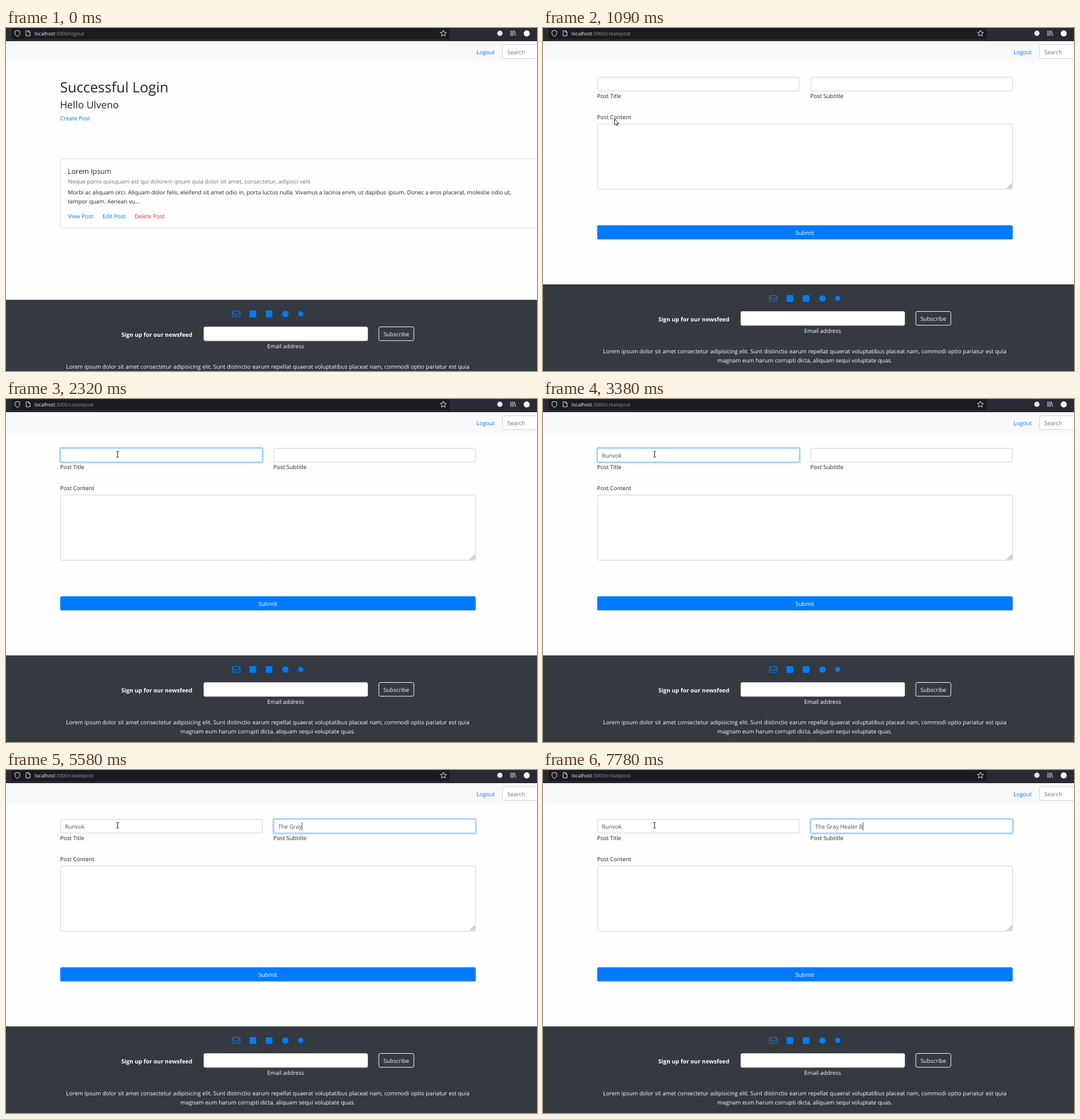
Animation of 930x602 px, one loop 8 s. Source, as an HTML page with a canvas:

```html
<!DOCTYPE html>
<html lang="en">
<head>
<meta charset="utf-8">
<title>Create post</title>
<style>
  html, body { margin: 0; width: 100%; height: 100%; overflow: hidden; background: #fff; }
  canvas { display: block; }
</style>
</head>
<body>
<canvas id="stage" width="930" height="602"></canvas>
<script>
const ctx = document.getElementById('stage').getContext('2d');
const LOOP = 8000;
const FAMILY = '"Open Sans", "Noto Sans", sans-serif';
const BODY = 9.92;
const BLUE = '#007bff', INK = '#212529', BORDER = '#ced4da', FIELD_INK = '#495057';
const PAGE_SWITCH = 1090, URL_SWITCH = 1020, FOCUS_TITLE = 1820, FOCUS_SUBTITLE = 3840;

const titleKeys = [[2520, 'R'], [2650, 'Ru'], [2850, 'Run'], [2980, 'Runv'], [3050, 'Runvo'], [3180, 'Runvok']];
const subtitleKeys = [
  [4320, 'T'], [4450, 'Th'], [4520, 'The'], [4720, 'The '],
  [5120, 'The G'], [5250, 'The Gr'], [5450, 'The Gra'], [5580, 'The Gray'], [5780, 'The Gray '],
  [6380, 'The Gray H'], [6450, 'The Gray He'], [6580, 'The Gray Hea'], [6650, 'The Gray Heal'],
  [6780, 'The Gray Heale'], [6920, 'The Gray Healer'], [7120, 'The Gray Healer '],
  [7380, 'The Gray Healer Be'], [7780, 'The Gray Healer B']
];
const caretHidden = [[2320, 2520], [3380, FOCUS_SUBTITLE], [4920, 5120], [5980, 6380], [7580, 7780]];

// time, x, y of the pointer tip
const pointerPath = [
  [0, 153, -12], [200, 162, 40], [400, 156, 100], [600, 138, 154], [710, 129, 164], [820, 125.5, 160],
  [1140, 125.5, 160], [1400, 168, 129], [1640, 191, 104], [1850, 195.5, 97], [LOOP, 195.5, 97]
];

const clamp01 = v => Math.min(1, Math.max(0, v));

function text(str, x, y, { color = INK, size = BODY, align = 'left', weight = 400 } = {}) {
  ctx.font = `${weight} ${size}px ${FAMILY}`;
  ctx.textRendering = 'geometricPrecision';
  ctx.textAlign = align;
  ctx.fillStyle = color;
  ctx.fillText(str, x, y);
  return ctx.measureText(str).width;
}

function rect(x, y, w, h, color) {
  ctx.fillStyle = color;
  ctx.fillRect(x, y, w, h);
}

function box(x, y, w, h, { fill, stroke, radius = 2.6, line = 1 } = {}) {
  ctx.beginPath();
  ctx.roundRect(x, y, w, h, radius);
  if (fill) { ctx.fillStyle = fill; ctx.fill(); }
  if (stroke) { ctx.strokeStyle = stroke; ctx.lineWidth = line; ctx.stroke(); }
}

function disc(x, y, r, color) {
  ctx.beginPath();
  ctx.arc(x, y, r, 0, 7);
  ctx.fillStyle = color;
  ctx.fill();
}

function outline(d, x, y, { color, line = 1, fill } = {}) {
  const path = new Path2D(d);
  ctx.save();
  ctx.translate(x, y);
  if (fill) { ctx.fillStyle = fill; ctx.fill(path); }
  ctx.strokeStyle = color;
  ctx.lineWidth = line;
  ctx.lineJoin = 'round';
  ctx.stroke(path);
  ctx.restore();
}

function star(x, y, r) {
  let d = '';
  for (let i = 0; i < 10; i++) {
    const a = -Math.PI / 2 + i * Math.PI / 5, k = i % 2 ? r * 0.48 : r;
    d += `${i ? 'L' : 'M'}${k * Math.cos(a)} ${k * Math.sin(a)}`;
  }
  outline(d + 'Z', x, y, { color: '#e4e4ea' });
}

function toolbar(path) {
  const light = '#e4e4ea';
  rect(0, 0, 930, 23, '#2b2a33');
  box(10, -6, 767, 25.5, { fill: '#1c1b22' });
  rect(0, 22, 930, 1, '#15141a');
  outline('M0 -5L4.2 -3.6V0C4.2 2.8 2.2 4.6 0 5.5C-2.2 4.6 -4.2 2.8 -4.2 0V-3.6Z', 20, 9.2, { color: light });
  outline('M-3.5 -4.5H1L3.5 -2V4.5H-3.5ZM1 -4.5V-2H3.5', 38.7, 9.3, { color: light });
  const hostWidth = text('localhost', 50, 13, { color: '#fbfbfe', size: 8.6 });
  text(':3000' + path, 50 + hostWidth, 13, { color: '#98979f', size: 8.6 });
  star(766, 9.6, 5.6);
  disc(865, 9.2, 4.6, light);
  outline('M-4 -4.5V4.5M-1.5 -4.5V4.5M1 -4.5V4.5M2.4 -4.2L5 4.5', 888, 9.2, { color: light });
  disc(912, 9.4, 5.3, '#ffffff');
}

function navbar() {
  rect(0, 23, 930, 37, '#f8f9fa');
  text('Logout', 824, 46, { color: BLUE });
  box(869.5, 29.5, 90, 24, { fill: '#fff', stroke: BORDER });
  text('Search', 878, 46, { color: '#6c757d' });
}

function footer(top) {
  ctx.save();
  ctx.translate(0, top);
  rect(0, 0, 930, 200, '#343a40');
  box(396.6, 19.6, 13.4, 10.4, { stroke: BLUE, radius: 1.5, line: 1.2 });
  outline('M0 0L5.2 4.2Q6.7 5.2 8.2 4.2L13.4 0', 396.6, 22, { color: BLUE, line: 1.2 });
  rect(426.5, 18.8, 11.8, 11.8, BLUE);
  rect(455, 19, 11.5, 11.5, BLUE);
  disc(489.4, 24.8, 5.6, BLUE);
  disc(516.2, 24.6, 4.6, BLUE);
  text('Sign up for our newsfeed', 202, 65, { color: '#fff', size: 10.05, weight: 700 });
  box(346.5, 47.5, 287, 24.5, { fill: '#fff', stroke: BORDER });
  text('Email address', 489.7, 85, { color: '#fff', align: 'center' });
  box(653, 47.5, 61.3, 24.2, { stroke: '#f8f9fa' });
  text('Subscribe', 683.5, 64, { color: '#f8f9fa', align: 'center' });
  text('Lorem ipsum dolor sit amet consectetur adipisicing elit. Sunt distinctio earum repellat quaerat voluptatibus placeat nam, commodi optio pariatur est quia',
    458.5, 121, { color: '#fff', align: 'center' });
  text('magnam eum harum corrupti dicta, aliquam sequi voluptate quas.', 458.5, 137, { color: '#fff', align: 'center' });
  ctx.restore();
}

function homePage(hover) {
  text('Successful Login', 94.5, 113, { size: 24.9 });
  text('Hello Ulveno', 94.5, 141, { size: 17.4 });
  const w = text('Create Post', 94.8, 162, { color: hover ? '#0056b3' : BLUE });
  if (hover) rect(95, 163, w, 1, '#0056b3');

  box(95.5, 229.5, 860, 121.5, { stroke: '#dfdfdf' });
  text('Lorem Ipsum', 108.3, 256, { size: 12.3 });
  text('Neque porro quisquam est qui dolorem ipsum quia dolor sit amet, consectetur, adipisci velit', 108.5, 273, { color: '#6c757d' });
  text('Morbi ac aliquam orci. Aliquam dolor felis, eleifend sit amet odio in, porta luctus nulla. Vivamus a lacinia enim, ut dapibus ipsum. Donec a eros placerat, molestie odio ut,', 108.5, 292);
  text('tempor quam. Aenean vu...', 108.5, 308);
  text('View Post', 108.5, 334, { color: BLUE });
  text('Edit Post', 169, 334, { color: BLUE });
  text('Delete Post', 225, 334, { color: '#d0312d' });
  footer(477);
}

function mixBorder(k) {
  const mix = (a, b) => Math.round(a + (b - a) * k);
  return `rgb(${mix(206, 128)},${mix(212, 189)},${mix(218, 255)})`;
}

function field(x, value, focus, caret) {
  if (focus > 0) {
    const ring = 2.1 * focus;
    box(x - ring, 86 - ring, 354.3 + 2 * ring, 25 + 2 * ring, { fill: `rgba(0,123,255,${0.25 * focus})`, radius: 4 });
  }
  box(x + 0.5, 86.5, 353.3, 24, { fill: '#fff', stroke: mixBorder(focus) });
  const w = text(value, x + 8.2, 103, { color: FIELD_INK });
  if (caret) rect(Math.round(x + 8.2 + w), 92, 1, 14, FIELD_INK);
}

const typed = (keys, t) => keys.reduce((value, [at, str]) => t >= at ? str : value, '');

function formPage(t) {
  const toSubtitle = clamp01((t - FOCUS_SUBTITLE) / 150);
  const toTitle = clamp01((t - FOCUS_TITLE) / 150);
  const caretOn = !caretHidden.some(([from, to]) => t >= from && t < to);
  field(95, typed(titleKeys, t), toTitle * (1 - toSubtitle), caretOn && t >= FOCUS_TITLE && t < FOCUS_SUBTITLE);
  field(468.5, typed(subtitleKeys, t), toSubtitle, caretOn && t >= FOCUS_SUBTITLE);
  text('Post Title', 94.8, 123);
  text('Post Subtitle', 468.3, 123);
  text('Post Content', 94.8, 160);
  box(95.5, 168.5, 727, 114.5, { fill: '#fff', stroke: BORDER });
  outline('M-9 0L0 -9M-6 0L0 -6M-3 0L0 -3', 821.5, 282, { color: '#77777f', line: 0.9 });
  box(95, 346.3, 727.7, 24.8, { fill: BLUE });
  text('Submit', 458.5, 363, { color: '#fff', align: 'center' });
  footer(450);
}

function pointerAt(t) {
  const i = pointerPath.findIndex(([at]) => at > t);
  const [t0, x0, y0] = pointerPath[i - 1], [t1, x1, y1] = pointerPath[i];
  const k = (t - t0) / (t1 - t0);
  return [x0 + (x1 - x0) * k, y0 + (y1 - y0) * k];
}

function pointer(x, y, inField) {
  if (inField) {
    outline('M-2.5 -5H-.8L0 -4.5L.8 -5H2.5M0 -4.5V4.5M-2.5 5H-.8L0 4.5L.8 5H2.5', x, y, { color: '#111' });
  } else {
    outline('M0 0V10L2.3 7.9L4 11.6L5.6 10.9L4 7.3H7.2Z', x, y, { color: '#111', line: 0.9, fill: '#fff' });
  }
}

function draw(t) {
  const [x, y] = pointerAt(t);
  const onForm = t >= PAGE_SWITCH;
  rect(0, 0, 930, 602, '#fefefe');
  if (onForm) formPage(t);
  else homePage(x < 148 && y > 151 && y < 167);
  navbar();
  toolbar(t < URL_SWITCH ? '/logout' : '/createpost');
  pointer(x, y, onForm && y < 111);
}

let start;
function frame(now) {
  start ??= now;
  draw((now - start) % LOOP);
  requestAnimationFrame(frame);
}
requestAnimationFrame(frame);
</script>
</body>
</html>
```
